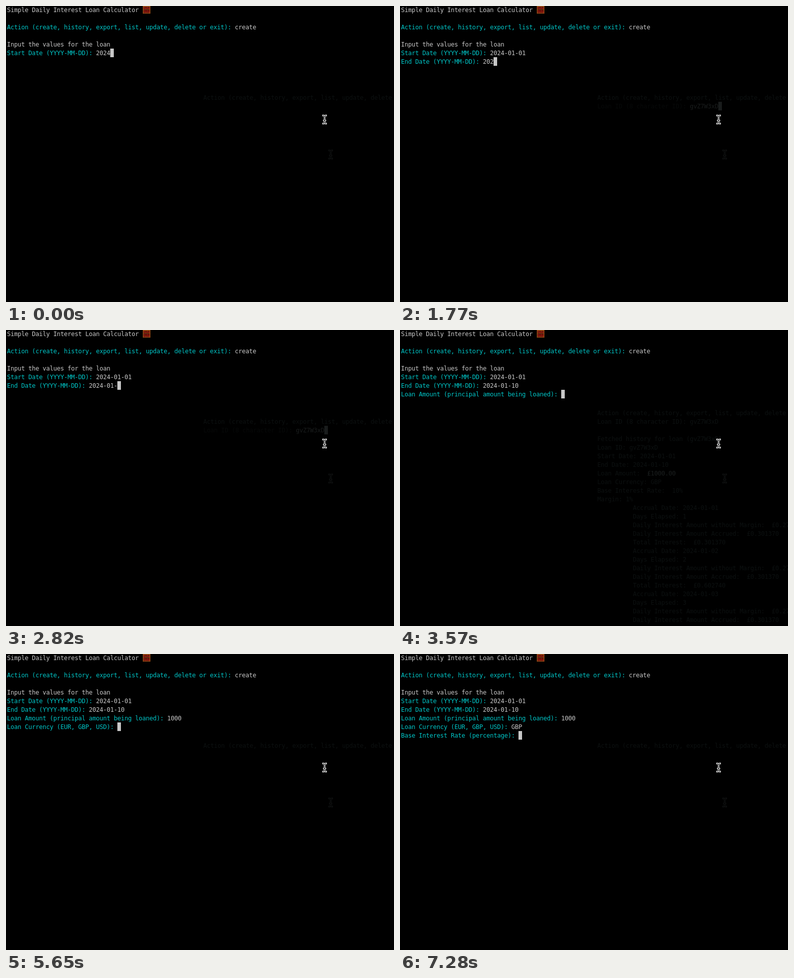
Recreate the animation shown at these times as an HTML page with a canvas. Size 763 by 584 pixels, loop 8 s.

```html
<!DOCTYPE html>
<html lang="en">
<head>
<meta charset="utf-8">
<title>Loan calculator terminal</title>
<style>
  html, body { margin: 0; width: 100%; height: 100%; overflow: hidden; background: #000; }
  canvas { display: block; }
</style>
</head>
<body>
<canvas id="screen" width="763" height="584"></canvas>
<script>
const ctx = document.getElementById('screen').getContext('2d');
const LOOP = 8000, CELL = 7, ROW = 17, LEFT = 2, BASE = 12;
const CYAN = '#00c5c7', GREY = '#c7c7c7';
const FAINT = '#0c1010', DIM = '#191c1c';
const ACTIONS = 'Action (create, history, export, list, update, delete or exit): ';
const LOAN_ID = 'gvZ7W3xD';

// Each prompt opens at `at`; keys are [time, characters typed so far].
const prompts = [
  { at: 0, label: 'Start Date (YYYY-MM-DD): ', text: '2024-01-01',
    keys: [[0, 4], [140, 5], [440, 7], [740, 8], [880, 9], [1030, 10]] },
  { at: 1180, label: 'End Date (YYYY-MM-DD): ', text: '2024-01-10',
    keys: [[1620, 2], [1770, 3], [1920, 4], [2220, 5], [2520, 6], [2670, 7], [2820, 8], [3420, 10]] },
  { at: 3570, label: 'Loan Amount (principal amount being loaned): ', text: '1000',
    keys: [[4610, 1], [4760, 2], [4910, 4]] },
  { at: 5650, label: 'Loan Currency (EUR, GBP, USD): ', text: 'GBP',
    keys: [[6840, 1], [6990, 2], [7130, 3]] },
  { at: 7280, label: 'Base Interest Rate (percentage): ', text: '', keys: [] }
];

const history = [
  ACTIONS, 'Loan ID (8 character ID): ' + LOAN_ID, '',
  'Fetched history for loan (' + LOAN_ID + ')', 'Loan ID: ' + LOAN_ID,
  'Start Date: 2024-01-01', 'End Date: 2024-01-10', 'Loan Amount:  £1000.00',
  'Loan Currency: GBP', 'Base Interest Rate:  10%', 'Margin: 1%'
];
for (let day = 1; day <= 3; day++) {
  history.push(...[
    'Accrual Date: 2024-01-0' + day,
    'Days Elapsed: ' + day,
    'Daily Interest Amount without Margin:  £0.273972',
    'Daily Interest Amount Accrued:  £0.301370',
    'Total Interest:  £' + (0.30137 * day).toFixed(6)
  ].map(line => ' '.repeat(10) + line));
}
history.length = 25;

// Places glyphs on the terminal's character grid.
function put(text, x, y, color) {
  ctx.fillStyle = color;
  [...text].forEach((ch, i) => {
    if (ch !== ' ') ctx.fillText(ch, x + i * CELL, y);
  });
}

function line(row, col, text, color) {
  put(text, LEFT + col * CELL, row * ROW + BASE, color);
}

function abacus(x, y) {
  ctx.fillStyle = '#9a4a16';
  ctx.fillRect(x, y, 15, 15);
  ctx.fillStyle = '#2a0d06';
  ctx.fillRect(x + 1.5, y + 2, 12, 11.5);
  ctx.fillStyle = '#9a4a16';
  ctx.fillRect(x + 1, y + 6, 13, 1);
  ctx.fillStyle = '#c01c12';
  for (let c = 0; c < 4; c++) {
    for (const r of [2.5, 4, 8, 9.8, 11.6]) {
      ctx.fillRect(x + 2 + c * 3, y + r + (c % 2) * 0.4, 2.2, 1.3);
    }
  }
}

function beam(x, y, edge, core) {
  const path = new Path2D();
  for (const s of [-1, 1]) {
    path.moveTo(x - 3, y + s * 8);
    path.quadraticCurveTo(x, y + s * 8, x, y + s * 5.5);
    path.quadraticCurveTo(x, y + s * 8, x + 3, y + s * 8);
  }
  path.moveTo(x, y - 6);
  path.lineTo(x, y + 6);
  path.moveTo(x - 1.5, y + 2);
  path.lineTo(x + 1.5, y + 2);
  ctx.lineCap = 'square';
  ctx.lineJoin = 'round';
  for (const [width, color] of [[3, edge], [1, core]]) {
    ctx.lineWidth = width;
    ctx.strokeStyle = color;
    ctx.stroke(path);
  }
}

// Barely visible remains of an earlier screen.
function afterglow(t) {
  const x = 388;
  if (t >= 3570 && t < 5650) {
    history.forEach((text, i) => put(text, x, 168 + i * ROW, FAINT));
    put('£1000.00', x + 14 * CELL, 168 + 7 * ROW, DIM);
  } else {
    put(ACTIONS, x, 185, FAINT);
    if (t >= 1180 && t < 3570) {
      put('Loan ID (8 character ID): ', x, 202, '#070909');
      put(LOAN_ID, x + 26 * CELL, 202, DIM);
      ctx.fillStyle = DIM;
      ctx.fillRect(x + 34 * CELL, 189, CELL, ROW);
    }
  }
  beam(638.5, 293, '#111313', '#000');
}

function draw(t) {
  ctx.fillStyle = '#000';
  ctx.fillRect(0, 0, 763, 584);
  ctx.font = '12px "DejaVu Sans Mono", "Liberation Mono", monospace';
  afterglow(t);

  line(0, 0, 'Simple Daily Interest Loan Calculator', GREY);
  abacus(269, 0);
  line(2, 0, ACTIONS, CYAN);
  line(2, ACTIONS.length, 'create', GREY);
  line(4, 0, 'Input the values for the loan', GREY);

  let row = 5, col = 0;
  prompts.filter(p => t >= p.at).forEach((p, i) => {
    const typed = p.keys.reduce((n, [at, count]) => t >= at ? count : n, 0);
    row = 5 + i;
    col = p.label.length + typed;
    line(row, 0, p.label, CYAN);
    line(row, p.label.length, p.text.slice(0, typed), GREY);
  });
  ctx.fillStyle = GREY;
  ctx.fillRect(LEFT + col * CELL, row * ROW - 1, CELL, ROW);

  beam(626.5, 224, '#fff', '#000');
}

const start = performance.now();
function tick() {
  draw((performance.now() - start) % LOOP);
  requestAnimationFrame(tick);
}
tick();
</script>
</body>
</html>
```
